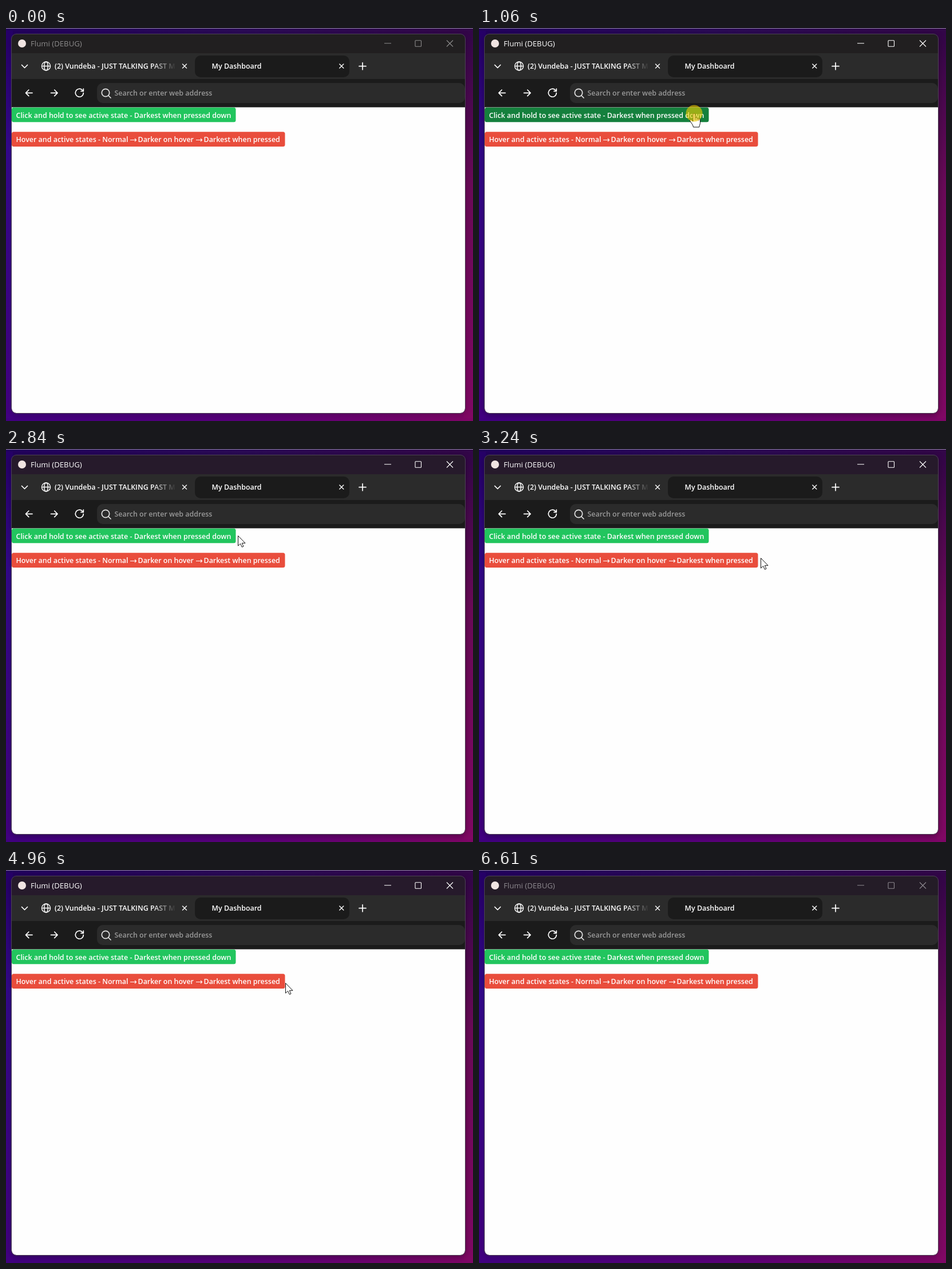
An HTML page for the animation above (6680 ms loop, 816x686 px).

```html
<!DOCTYPE html>
<html lang="en">
<head>
<meta charset="utf-8">
<title>Button states</title>
<style>
  html, body { margin: 0; width: 100%; height: 100%; overflow: hidden; background: #2a0a70; }
  svg { display: block; width: 816px; height: 686px; }
  text { font: 600 12.45px "Open Sans", "Noto Sans", sans-serif; fill: #fff; white-space: pre; }
  #caption text { font-weight: 400; font-size: 13.2px; }
  .line { fill: none; stroke: #fff; stroke-width: 1.7; stroke-linecap: round; stroke-linejoin: round; }
  .small { stroke-width: 1.4; }
  .thin { fill: none; stroke: #fff; stroke-width: 1.1; }
  .pointer { fill: #fff; stroke: #111; stroke-width: 1; stroke-linejoin: round; }
</style>
</head>
<body>
<svg viewBox="0 0 816 686">
  <defs>
    <linearGradient id="top"><stop stop-color="#22005e"/><stop offset=".5" stop-color="#2a0a56"/><stop offset="1" stop-color="#320648"/></linearGradient>
    <linearGradient id="bottom"><stop stop-color="#400080"/><stop offset=".5" stop-color="#58007a"/><stop offset="1" stop-color="#7e0666"/></linearGradient>
    <linearGradient id="left" x2="0" y2="1"><stop stop-color="#260068"/><stop offset=".3" stop-color="#34088e"/><stop offset="1" stop-color="#430082"/></linearGradient>
    <linearGradient id="right" x2="0" y2="1"><stop stop-color="#320648"/><stop offset=".4" stop-color="#6a0a58"/><stop offset="1" stop-color="#800864"/></linearGradient>
    <linearGradient id="fade"><stop stop-color="#2b2b2b" stop-opacity="0"/><stop offset="1" stop-color="#2b2b2b"/></linearGradient>
    <clipPath id="frame"><rect x="10" y="11" width="792" height="661" rx="8"/></clipPath>
    <clipPath id="tabClip"><rect x="80" y="50" width="215" height="32"/></clipPath>
    <filter id="blur" x="-10%" y="-10%" width="120%" height="120%"><feGaussianBlur stdDeviation="6"/></filter>
  </defs>

  <rect width="816" height="343" fill="url(#top)"/>
  <rect y="343" width="816" height="343" fill="url(#bottom)"/>
  <rect y="5" width="12" height="676" fill="url(#left)"/>
  <rect x="800" y="5" width="16" height="676" fill="url(#right)"/>
  <rect width="816" height="1" fill="#9188a4"/>
  <rect id="shadow" x="9" y="13" width="794" height="662" rx="9" filter="url(#blur)"/>

  <g clip-path="url(#frame)">
    <rect id="titlebar" x="10" y="11" width="792" height="33"/>
    <rect x="10" y="44" width="792" height="45" fill="#2b2b2b"/>
    <rect x="10" y="89" width="792" height="50" fill="#1b1b1b"/>
    <rect x="10" y="138.4" width="792" height="533.6" fill="#fefefe"/>
  </g>
  <rect x="9.5" y="10.5" width="793" height="662" rx="8.5" fill="none" stroke="#4d4354"/>

  <circle cx="28" cy="27" r="7" fill="#f0e4e2"/>
  <g id="caption">
    <text x="43" y="31.7">Flumi (DEBUG)</text>
    <path class="thin" d="M661 26.8h12M770 21.5l11 11m0-11l-11 11"/>
    <rect class="thin" x="715" y="21.7" width="10.5" height="10.5" rx="1"/>
  </g>

  <path class="line" d="M27.5 64.5l5 5 5-5"/>
  <g class="line small">
    <circle cx="70" cy="66.5" r="7.5"/>
    <ellipse cx="70" cy="66.5" rx="3.3" ry="7.5"/>
    <path d="M62.5 66.5h15"/>
  </g>
  <text x="85" y="71" clip-path="url(#tabClip)">(2) Vundeba - JUST TALKING PAST MY</text>
  <rect x="255" y="52" width="42" height="30" fill="url(#fade)"/>
  <rect x="330" y="48" width="270" height="38" rx="10" fill="#1b1b1b"/>
  <text x="359.5" y="71">My Dashboard</text>
  <path class="line small" d="M308.5 63l7 7m0-7l-7 7M582.8 63l7 7m0-7l-7 7"/>
  <path class="line" d="M617 66.7h12m-6-6v12"/>

  <path class="line" d="M46 113.3H34.5m5.3-5.3l-5.3 5.3 5.3 5.3M78.5 113.3H90m-5.3-5.3l5.3 5.3-5.3 5.3"/>
  <path class="line" d="M135.3 113.3a7 7 0 1 1-2-5l2 2m0-4.3v4.3h-4.3"/>
  <rect x="159" y="96" width="643" height="35" rx="10" fill="#2b2b2b"/>
  <g class="line" style="stroke:#e4e4e4">
    <circle cx="174" cy="113" r="6.7"/>
    <path d="M179 118l4 4"/>
  </g>
  <text x="189.5" y="118" style="fill:#999">Search or enter web address</text>

  <rect id="green" x="10" y="138.7" width="391.5" height="25.6" rx="3.5"/>
  <text x="17.5" y="156.5">Click and hold to see active state - Darkest when pressed down</text>
  <rect id="red" x="10" y="181.2" width="477.5" height="25.8" rx="3.5"/>
  <text y="199"><tspan x="17.5">Hover and active states - Normal</tspan><tspan x="230.5">Darker on hover</tspan><tspan x="345.5">Darkest when pressed</tspan></text>
  <path class="thin" d="M217 195.5h10.5m-2.5-2.5l2.5 2.5-2.5 2.5M332 195.5h10.5m-2.5-2.5l2.5 2.5-2.5 2.5"/>

  <g id="cursor">
    <path id="arrow" class="pointer" d="M.5 .5V18l4.1-3.8 2.7 6 2.7-1.2-2.7-5.7H13z"/>
    <path id="hand" class="pointer" d="M-2 2a1.9 1.9 0 0 1 3.8 0v6c1-1 3-.8 3.3 .7 1-.8 2.6-.4 2.9 .9 1-.5 2.5 0 2.5 1.7v5.2c0 3-1.5 4-1.7 7.5H-1.5c-.2-4-4-7.5-6-11-.8-1.8 1.5-2.9 2.9-1.5L-2 14zM1.8 8v4m3.3-3.3V12M8 9.6v2.9"/>
    <circle id="press" r="14.5" fill="#f0cd00" fill-opacity=".6"/>
  </g>
</svg>
<script>
const LOOP = 6680, TICK = 66.14;
const el = id => document.getElementById(id);

// [tick, x, y]
const path = [
  [1, 733, 633], [4, 520, 340], [7, 400, 185], [10, 376, 149], [23, 376, 149],
  [25, 394, 148], [42, 394, 148], [43, 405, 151], [47, 486, 176], [49, 492, 190],
  [52, 473, 195], [53, 470, 195], [67, 470, 195], [71, 531, 195], [73, 520, 197],
  [75, 488, 197], [77, 474, 194], [81, 464, 194], [88, 464, 194],
  [91, 520, 262], [94, 660, 475], [96, 754, 670]
];
const presses = [[16, 23], [28, 37], [60, 67], [82, 88]];
const focusSteps = [[0, 0], [16, 0], [19, 1], [98, 1], [100, .6], [101, .6]];
const buttons = [
  { id: "green", right: 401, top: 139, bottom: 164, colors: ["#22c55e", "#16a34a", "#15803d"] },
  { id: "red", right: 487, top: 181, bottom: 207, colors: ["#e94d3c", "#c0392b", "#a93226"] }
];

function sample(steps, tick) {
  const last = steps.length - 1;
  if (tick <= steps[0][0]) return steps[0].slice(1);
  if (tick >= steps[last][0]) return steps[last].slice(1);
  const i = steps.findIndex(s => s[0] > tick);
  const a = steps[i - 1], b = steps[i];
  const u = (tick - a[0]) / (b[0] - a[0]);
  return a.slice(1).map((v, k) => v + (b[k + 1] - v) * u);
}

const mix = (a, b, u) => `rgb(${a.map((v, i) => Math.round(v + (b[i] - v) * u))})`;
const show = (id, on) => el(id).style.display = on ? "" : "none";

function draw(time) {
  const tick = Math.floor((time % LOOP + 8) / TICK);
  const visible = tick >= 1 && tick <= 96;
  const pressed = presses.some(([a, b]) => tick >= a && tick < b);
  const [x, y] = sample(path, tick);
  let over = false;

  for (const b of buttons) {
    const inside = visible && x <= b.right && y >= b.top && y <= b.bottom;
    over ||= inside;
    el(b.id).setAttribute("fill", b.colors[inside ? (pressed ? 2 : 1) : 0]);
  }
  show("cursor", visible);
  show("hand", over);
  show("arrow", !over);
  show("press", pressed);
  el("cursor").setAttribute("transform", `translate(${x} ${y})`);

  const [focus] = sample(focusSteps, tick);
  const active = tick >= 16 && tick < 99;
  el("titlebar").setAttribute("fill", mix([33, 31, 32], [38, 26, 43], focus));
  el("shadow").setAttribute("opacity", active ? .36 : .22);
  el("caption").style.opacity = active ? 1 : .48;
}

function loop() {
  draw(performance.now());
  requestAnimationFrame(loop);
}
loop();
</script>
</body>
</html>
```
